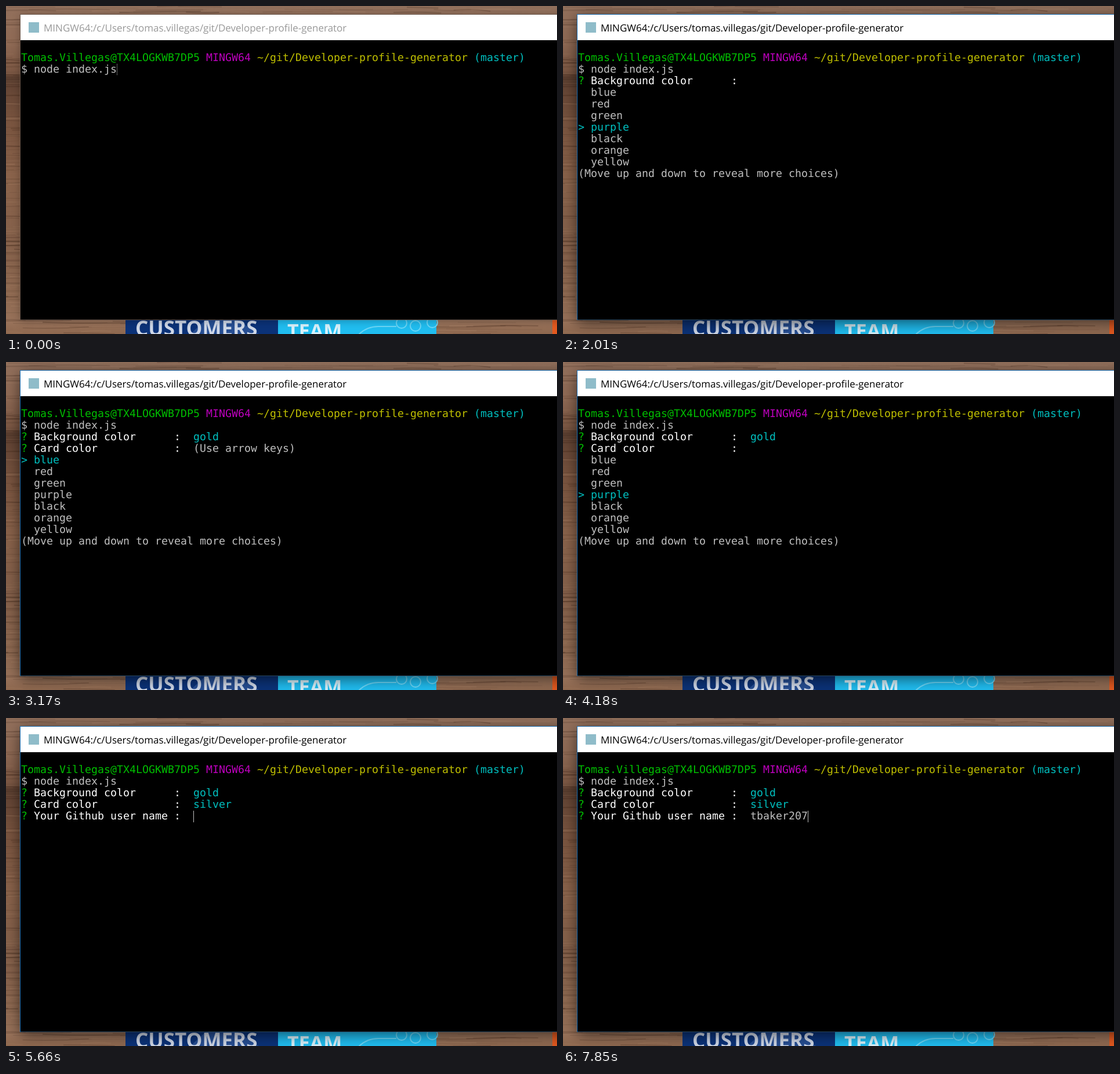
Recreate the animation shown at these times as an HTML page with a canvas. Size 950 by 566 pixels, loop 8000 ms.

```html
<!DOCTYPE html>
<html lang="en">
<head>
<meta charset="utf-8">
<title>Terminal prompt</title>
<style>
html, body { margin: 0; width: 100%; height: 100%; overflow: hidden; background: #000; }
canvas { display: block; }
</style>
</head>
<body>
<canvas id="stage" width="950" height="566"></canvas>
<script>
const W = 950, H = 566, LOOP = 8000;
const ctx = document.getElementById('stage').getContext('2d');
const MONO = '18.27px "DejaVu Sans Mono", monospace';
const SANS = '"Open Sans", "Noto Sans", sans-serif';
const GREEN = '#00bf00', CYAN = '#00bfbf', GREY = '#bfbfbf', WHITE = '#fff';
const COL = 11, ROW = 20, LEFT = 26, TOP = 80;
const ANSWER_COL = 27;

const FOCUS = 70, ENTER = 680, ASK_BACK = 1230, ASK_CARD = 3170, ASK_USER = 5660, BLINK = 6210;
const backKeys = [1700, 1855, 2010, 2240, 2440, 2640, 2870];
const cardKeys = [3630, 3820, 4010, 4200, 4390, 4580, 4730, 4930, 5130];
const typeKeys = [6365, 6520, 6675, 6830, 7130, 7210, 7530, 7690, 7850];
const colors = ['blue', 'red', 'green', 'purple', 'black', 'orange', 'yellow', 'gold', 'white', 'silver'];
const userName = 'tbaker207';

const countPast = (times, t) => times.filter(k => t >= k).length;

function rect(c, color, x, y, w, h) {
  c.fillStyle = color;
  c.fillRect(x, y, w, h);
}

function label(c, str, x, y, color, font) {
  c.font = font;
  c.fillStyle = color;
  c.fillText(str, x, y);
}

function text(str, col, row, color = GREY) {
  label(ctx, str, LEFT + col * COL, TOP + row * ROW + 15, color, MONO);
}

function drawWood(c) {
  let seed = 11;
  const rnd = () => (seed = seed * 16807 % 2147483647) / 2147483647;
  const tone = c.createLinearGradient(0, 0, 0, H);
  [[0, '#92705c'], [60, '#8f6a55'], [112, '#7c5844'], [125, '#553a2c'], [138, '#644535'],
   [200, '#79543f'], [300, '#8a634b'], [400, '#84604a'], [500, '#8d6850'], [545, '#98725a'], [566, '#8e684f']]
    .forEach(([y, color]) => tone.addColorStop(y / H, color));
  rect(c, tone, 0, 0, W, H);
  for (let i = 0; i < 1500; i++) {
    const x = rnd() * W - 90, y = rnd() * H, len = 30 + rnd() * 150;
    c.strokeStyle = rnd() < 0.6 ? `rgba(50,28,16,${rnd() * 0.3})` : `rgba(200,160,130,${rnd() * 0.2})`;
    c.lineWidth = 0.6 + rnd() * 1.5;
    c.beginPath();
    c.moveTo(x, y);
    c.quadraticCurveTo(x + len / 2, y + rnd() * 6 - 3, x + len, y + rnd() * 4 - 2);
    c.stroke();
  }
}

function drawBanner(c) {
  rect(c, '#0b3278', 206, 540, 263, 26);
  c.fillStyle = 'rgba(110,150,215,.28)';
  c.beginPath();
  c.moveTo(318, 566);
  c.lineTo(345, 541);
  c.lineTo(398, 541);
  c.lineTo(436, 566);
  c.fill();
  rect(c, '#20bdf0', 469, 540, 273, 26);
  c.strokeStyle = '#6cd6f7';
  c.lineWidth = 2;
  c.beginPath();
  c.moveTo(608, 567);
  c.quadraticCurveTo(622, 553, 642, 553);
  c.lineTo(673, 553);
  c.stroke();
  [[682, 547], [706, 552], [735, 546]].forEach(([x, y]) => {
    c.beginPath();
    c.arc(x, y, 9, 0, 7);
    c.stroke();
  });
  label(c, 'CUSTOMERS', 223, 569, '#cfd8e8', `bold 35px ${SANS}`);
  label(c, 'TEAM', 485, 573, '#d8f2fc', `bold 34px ${SANS}`);
  rect(c, '#e2591f', 942, 541, 8, 25);
}

const desktop = document.createElement('canvas');
desktop.width = W;
desktop.height = H;
drawWood(desktop.getContext('2d'));
drawBanner(desktop.getContext('2d'));

function drawWindow(t) {
  const active = t >= FOCUS;
  const fade = Math.min(1, Math.max(0, (t - FOCUS + 60) / 430));
  ctx.drawImage(desktop, 0, 0);
  ctx.save();
  ctx.shadowColor = `rgba(0,0,0,${0.3 + 0.3 * fade})`;
  ctx.shadowBlur = 14 + 10 * fade;
  ctx.shadowOffsetY = 2 + 3 * fade;
  rect(ctx, '#000', 25, 15, W + 20, 526);
  ctx.restore();
  rect(ctx, active ? '#1b6fb5' : '#6b574b', 24, 14, W, 528);
  rect(ctx, active ? '#27465f' : '#5a4a42', 25, 541, W, 1);
  rect(ctx, WHITE, 25, 15, W, 44);
  rect(ctx, '#000', 25, 59, W, 482);
  rect(ctx, '#8fbcc9', 39, 28, 18, 18);
  label(ctx, 'MINGW64:/c/Users/tomas.villegas/git/Developer-profile-generator',
    65, 44, active ? '#000' : '#999', `17px ${SANS}`);
}

function drawCursor(col, row, dotted) {
  const x = LEFT + col * COL, y = TOP + row * ROW;
  for (let i = 0; i < ROW; i += 2) rect(ctx, GREY, x, y + i, 1, dotted ? 1 : 2);
}

function question(str, row, answer = '', color = CYAN) {
  text('?', 0, row, GREEN);
  text(str.padEnd(22) + ':', 2, row, WHITE);
  text(answer, ANSWER_COL, row, color);
}

// The pointer moves to the middle row, then the list scrolls beneath it.
function choices(str, row, picked) {
  question(str, row, picked ? '' : '(Use arrow keys)', GREY);
  const first = Math.max(0, picked - 3);
  for (let i = 0; i < 7; i++) {
    const on = first + i === picked;
    if (on) text('>', 0, row + 1 + i, CYAN);
    text(colors[(first + i) % colors.length], 2, row + 1 + i, on ? CYAN : GREY);
  }
  text('(Move up and down to reveal more choices)', 0, row + 8);
}

function drawTerminal(t) {
  text('Tomas.Villegas@TX4LOGKWB7DP5', 0, 0, GREEN);
  text('MINGW64', 29, 0, '#bf00bf');
  text('~/git/Developer-profile-generator', 37, 0, '#bfbf00');
  text('(master)', 71, 0, CYAN);
  text('$ node index.js', 0, 1);

  if (t < ENTER) return drawCursor(15, 1, t < FOCUS);
  if (t < ASK_BACK) return drawCursor(0, 2);
  if (t < ASK_CARD) return choices('Background color', 2, countPast(backKeys, t));
  question('Background color', 2, 'gold');
  if (t < ASK_USER) return choices('Card color', 3, countPast(cardKeys, t));
  question('Card color', 3, 'silver');
  const typed = countPast(typeKeys, t);
  question('Your Github user name', 4, userName.slice(0, typed), GREY);
  if (t < BLINK || typed) drawCursor(ANSWER_COL + typed, 4);
}

ctx.textRendering = 'geometricPrecision';
const start = performance.now();

function frame() {
  const t = (performance.now() - start) % LOOP;
  drawWindow(t);
  drawTerminal(t);
  requestAnimationFrame(frame);
}
frame();
</script>
</body>
</html>
```
